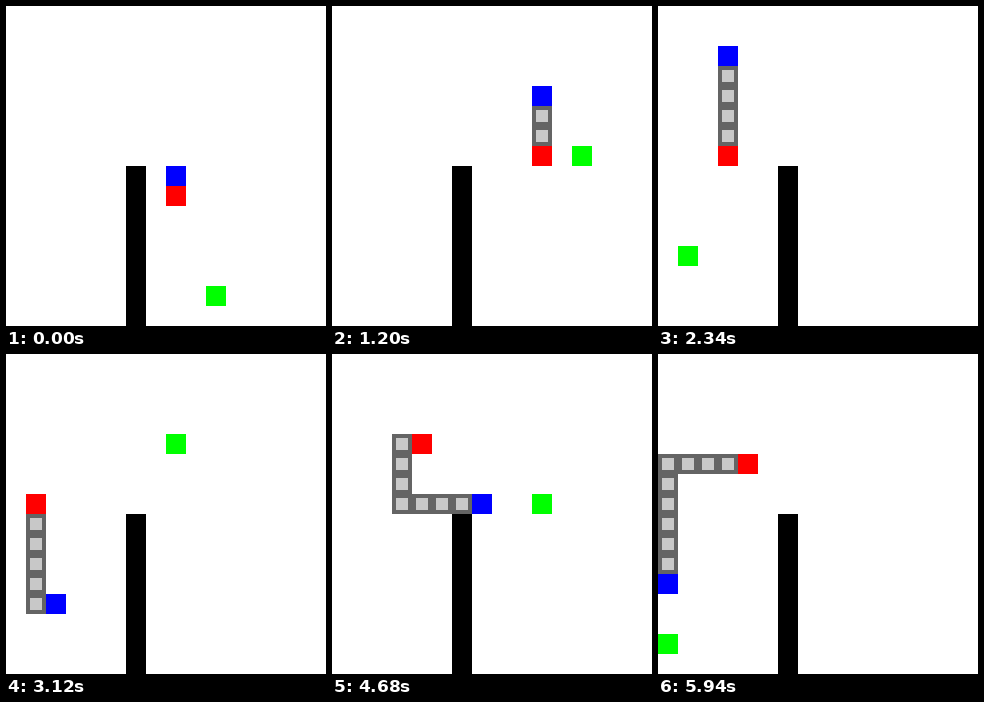
Write an HTML page with a canvas that moves like this. It is 320 by 320 pixels and loops after 6 s.

```html
<!DOCTYPE html>
<html lang="en">
<head>
<meta charset="utf-8">
<title>Snake</title>
<style>
  html, body { margin: 0; width: 100%; height: 100%; overflow: hidden; background: #fff; }
  canvas { display: block; width: 320px; height: 320px; }
</style>
</head>
<body>
<canvas id="stage" width="320" height="320"></canvas>
<script>
const CELL = 20, GRID = 16, STEP = 60, STEPS = 100;
const WALL = { x: 6, y: 8 };
const FOODS = [[10, 14], [10, 4], [12, 7], [3, 2], [1, 12], [8, 4], [3, 7], [10, 7], [4, 5], [0, 14]];

const ctx = document.getElementById('stage').getContext('2d');
const same = (a, b) => a[0] === b[0] && a[1] === b[1];

function isFree(cell, snake) {
  const [x, y] = cell;
  const inside = x >= 0 && y >= 0 && x < GRID && y < GRID;
  const inWall = x === WALL.x && y >= WALL.y;
  return inside && !inWall && !snake.slice(0, -1).some(part => same(part, cell));
}

// Greedy steering: close the horizontal gap first, then the vertical one.
function nextHead(snake, food) {
  const [x, y] = snake[0];
  const dx = Math.sign(food[0] - x), dy = Math.sign(food[1] - y);
  const moves = [[dx, 0], [0, dy], [1, 0], [-1, 0], [0, -1], [0, 1]];
  return moves
    .filter(([mx, my]) => mx || my)
    .map(([mx, my]) => [x + mx, y + my])
    .find(cell => isFree(cell, snake));
}

function simulate() {
  let snake = [[8, 8], [8, 9]], meal = 0;
  const states = [];
  for (let i = 0; i < STEPS; i++) {
    states.push({ snake, food: FOODS[meal] });
    const head = nextHead(snake, FOODS[meal]);
    const ate = same(head, FOODS[meal]);
    snake = [head, ...(ate ? snake : snake.slice(0, -1))];
    if (ate) meal++;
  }
  return states;
}

function square([x, y], color, inset = 0) {
  ctx.fillStyle = color;
  ctx.fillRect(x * CELL + inset, y * CELL + inset, CELL - 2 * inset, CELL - 2 * inset);
}

function draw({ snake, food }) {
  ctx.fillStyle = '#fff';
  ctx.fillRect(0, 0, GRID * CELL, GRID * CELL);
  for (let y = WALL.y; y < GRID; y++) square([WALL.x, y], '#000');
  square(food, '#0f0');
  for (const part of snake.slice(1, -1)) {
    square(part, '#646464');
    square(part, '#c8c8c8', 4);
  }
  square(snake[snake.length - 1], '#f00');
  square(snake[0], '#00f');
}

const states = simulate();

function tick() {
  draw(states[Math.floor(performance.now() / STEP) % STEPS]);
  requestAnimationFrame(tick);
}
tick();
</script>
</body>
</html>
```
